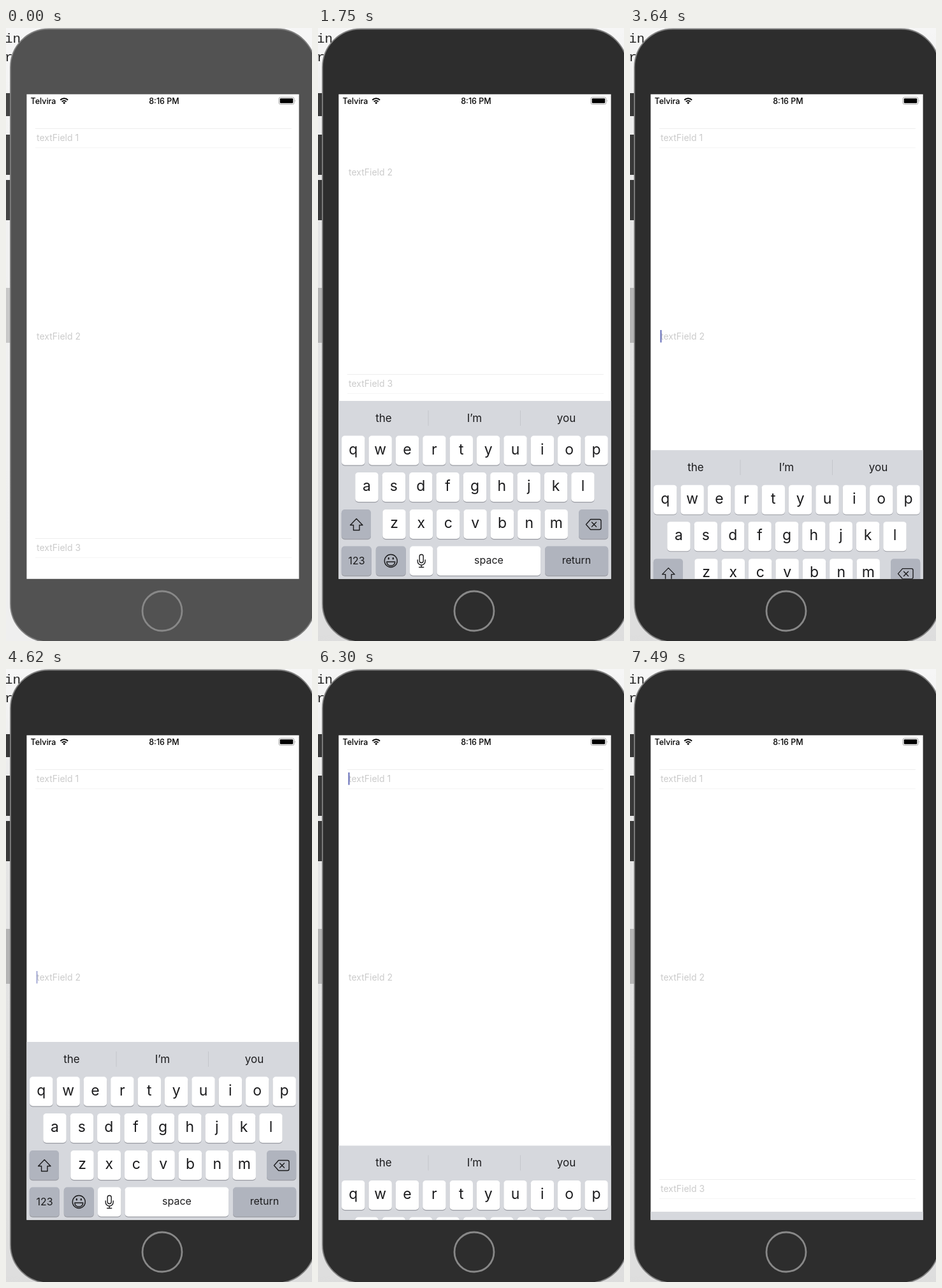
Write an HTML page that moves like this. It is 480 px wide and 960 px high and loops after 7.56 s.

```html
<!DOCTYPE html>
<html lang="en">
<head>
<meta charset="utf-8">
<title>Text fields and keyboard</title>
<style>
html, body { margin: 0; width: 100%; height: 100%; overflow: hidden; background: #f6f6f6; }
svg { display: block; width: 480px; height: 960px; }
text { font-family: Inter, "Open Sans", sans-serif; white-space: pre; }
.code { font: 21px "Liberation Mono", monospace; fill: #222; }
.status { font-size: 12.5px; font-weight: 500; }
.hint { font-size: 14px; fill: #cbcbcb; }
.icon { fill: none; stroke: #1c1c1e; stroke-width: 1.4; stroke-linejoin: round; stroke-linecap: round; }
#keyboard text { text-anchor: middle; fill: #1c1c1e; }
</style>
</head>
<body>
<svg viewBox="0 0 480 960">
  <defs>
    <clipPath id="screen"><rect x="32.4" y="103.8" width="427.2" height="759"/></clipPath>
    <linearGradient id="shade" x2="0" y2="1">
      <stop offset="0" stop-color="#000" stop-opacity="0"/>
      <stop offset=".3" stop-color="#000" stop-opacity=".07"/>
      <stop offset="1" stop-color="#000" stop-opacity=".1"/>
    </linearGradient>
  </defs>

  <rect width="480" height="960" fill="#f6f6f6"/>
  <rect id="shadow" width="480" height="960" fill="url(#shade)"/>
  <rect id="band" y="407" width="10" height="86"/>
  <text class="code" x="-2" y="23">in</text>
  <text class="code" x="-2" y="52">r</text>
  <g id="buttons">
    <rect x="-4" y="102" width="14" height="36" rx="2"/>
    <rect x="-4" y="167" width="14" height="63" rx="2"/>
    <rect x="-4" y="238" width="14" height="63" rx="2"/>
  </g>
  <g id="body" stroke="#808080">
    <rect x="7" y="1.5" width="478" height="960" rx="60" stroke-width="1.8"/>
    <circle cx="245" cy="913" r="31" stroke="#888" stroke-width="2.8"/>
  </g>

  <g clip-path="url(#screen)">
    <rect x="32" y="103" width="428" height="760" fill="#fff"/>
    <g id="page"></g>
    <text class="status" x="38.5" y="119">Telvira</text>
    <text class="status" x="248" y="119" text-anchor="middle">8:16 PM</text>
    <g fill="none" stroke="#000" stroke-width="2">
      <path d="M85.3 112.8a8.3 8.3 0 0 1 11.8 0M87.7 115.4a5 5 0 0 1 7 0"/>
      <path d="M91.2 119.2l-2-2.2a2.9 2.9 0 0 1 4 0z" fill="#000" stroke="none"/>
    </g>
    <rect x="428" y="108.5" width="24" height="11" rx="2.5" fill="#fff" stroke="#aaa"/>
    <rect x="429.7" y="110.2" width="20.6" height="7.6" rx="1.2"/>
    <path d="M453.2 112.3q1.6 1.7 0 3.4z" fill="#999"/>
    <g id="keyboard"></g>
  </g>
</svg>
<script>
const LOOP = 7560, STEP = 70, KEYBOARD_H = 279, SHIFT = 257, SPRING = 0.0168;
const $ = id => document.getElementById(id);

// --- Page: three text fields, each with its own cursor ---
const fieldY = [172, 483, 814];
const line = (y, color) => `<path d="M46 ${y}H448" stroke="${color}"/>`;
$("page").innerHTML = fieldY.map((y, i) =>
  (i === 1 ? "" : line(y - 14.5, "#eee") + line(y + 15.5, "#f5f5f5")) +
  `<text class="hint" x="48" y="${y + 5}">textField ${i + 1}</text>` +
  `<rect id="cursor${i}" x="47.5" y="${y - 10}" width="2" height="19.5" fill="#626bb8"/>`).join("");

// --- Keyboard, in its raised position ---
const label = (x, y, size, s) => `<text x="${x}" y="${y}" font-size="${size}">${s}</text>`;
function key(x, y, w, fill = "#fff") {
  const box = (top, color) => `<rect x="${x}" y="${top}" width="${w}" height="46" rx="5" fill="${color}"/>`;
  return box(y + 1.2, "#9b9da4") + box(y, fill);
}
const GREY = "#b0b4be";
let keys = `<rect x="32" y="584" width="428" height="${KEYBOARD_H}" fill="#d6d8dd"/>` +
  `<path d="M173 599v24M317.5 599v24" stroke="#c4c6cc"/>`;
[["the", 103], ["I’m", 245.5], ["you", 389.5]].forEach(([s, x]) => keys += label(x, 617, 17, s));
[["qwertyuiop", 55.3, 638.5], ["asdfghjkl", 76.5, 696], ["zxcvbnm", 119.5, 754]].forEach(([row, x0, y]) =>
  [...row].forEach((c, i) => {
    const x = x0 + 42.37 * i;
    keys += key(x - 18.2, y, 36.4) + label(x, y + 29, 23, c);
  }));
keys += key(36.8, 754, 46.2, GREY) + key(409, 754, 46.2, GREY) +
  key(36.8, 811.5, 47, GREY) + label(60.5, 840, 16, "123") +
  key(90.8, 811.5, 47, GREY) + key(144, 811.5, 36.4) +
  key(186.5, 811.5, 162.8) + label(268, 839, 16, "space") +
  key(356, 811.5, 99.2, GREY) + label(405.5, 839, 16, "return") +
  `<g class="icon">
    <path d="M60.3 768.5l9.7 10h-5v8h-9.4v-8h-5z"/>
    <path d="M427.5 769.5h14q2.5 0 2.5 2.5v11q0 2.5-2.5 2.5h-14l-7-8zM429.5 774l7 7m0-7l-7 7"/>
    <circle cx="114.3" cy="834.5" r="10"/>
    <path d="M107.8 836h13a6.5 6.2 0 0 1-13 0z"/>
    <path d="M110.8 830v1.5m7-1.5v1.5" stroke-width="2.2"/>
    <rect x="159.2" y="824.5" width="6" height="13" rx="3"/>
    <path d="M156.2 833v2a6 6 0 0 0 12 0v-2m-6 8v3.5m-3.5 0h7"/>
  </g>`;
$("keyboard").innerHTML = keys;

// --- Motion ---
// field: focused field; up/down: keyboard starts; off/on: cursor blink
const focus = [
  { field: 2, up: 965, off: 1750, on: 2100, down: 1875 },
  { field: 1, up: 3488, off: 4270, on: 4620, down: 4930 },
  { field: 0, up: 6215, off: 7140, on: 7500, down: 7203 }
];
const ease = t => t <= 0 ? 0 : 1 - (1 + SPRING * t) * Math.exp(-SPRING * t);

function cursorAlpha(f, t) {
  if (t < f.up || t >= f.down) return 0;
  if (t < f.off) return 1;
  return t < f.on ? 0 : Math.min(1, 0.55 + (t - f.on) / 300);
}

function draw(t) {
  const active = t >= 840;
  $("body").setAttribute("fill", active ? "#2d2d2d" : "#525252");
  $("buttons").setAttribute("fill", active ? "#383838" : "#444");
  $("band").setAttribute("fill", active ? "#b4b4b4" : "#c8c8c8");
  $("shadow").setAttribute("opacity", active ? 1 : 0.3);

  let raised = 0, shift = 0;
  for (const f of focus) {
    const p = ease(t - f.up) - ease(t - f.down);
    raised += p;
    if (f.field === 2) shift = p * SHIFT;
    $("cursor" + f.field).setAttribute("opacity", cursorAlpha(f, t));
  }
  $("page").setAttribute("transform", `translate(0 ${-shift})`);
  $("keyboard").setAttribute("transform", `translate(0 ${KEYBOARD_H * (1 - raised)})`);
}

const start = performance.now();
function tick() {
  const t = (performance.now() - start) % LOOP;
  draw(Math.floor(t / STEP) * STEP);
  requestAnimationFrame(tick);
}
tick();
</script>
</body>
</html>
```
